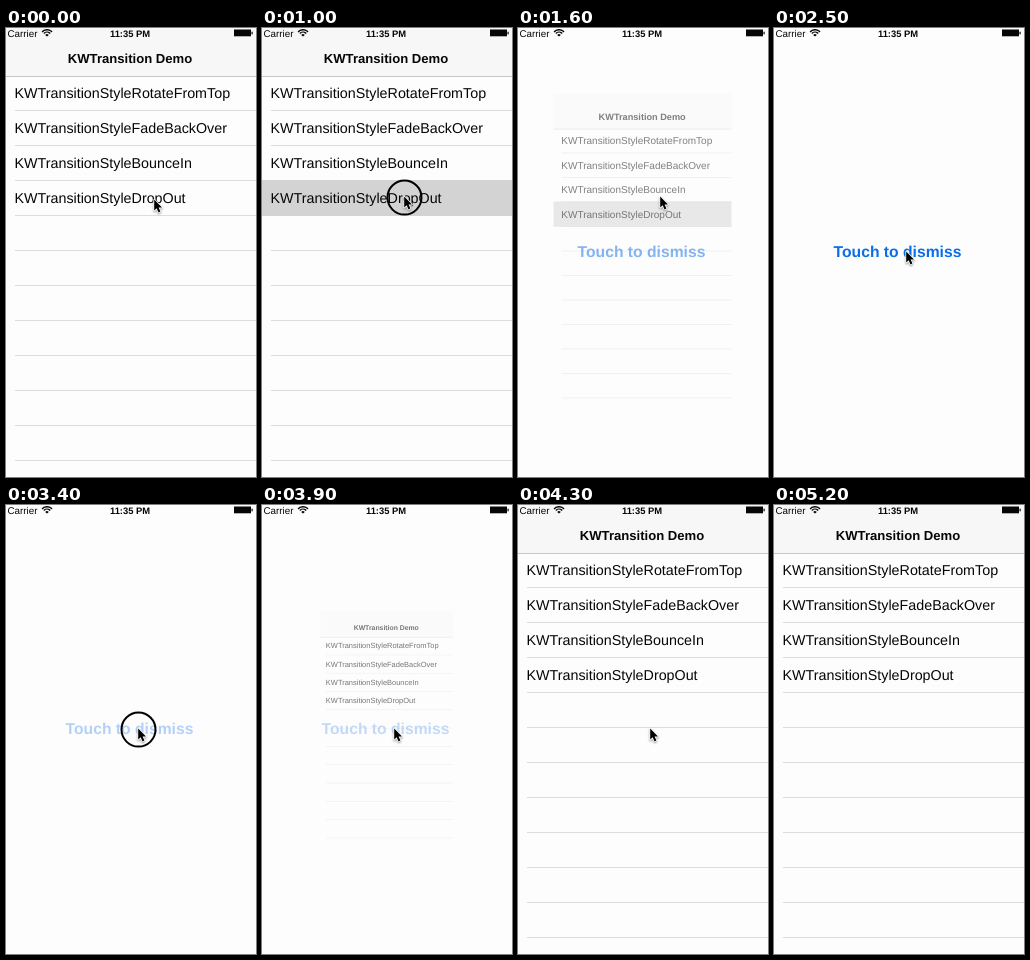
Write an HTML page with a canvas that moves like this. It is 250x449 px and loops after 5.7 s.

```html
<!DOCTYPE html>
<html lang="en">
<head>
<meta charset="utf-8">
<title>Transition demo</title>
<style>
  html, body { margin: 0; width: 100%; height: 100%; overflow: hidden; background: #fdfdfd; }
  canvas { display: block; width: 250px; height: 449px; }
</style>
</head>
<body>
<canvas id="stage" width="250" height="449"></canvas>
<script>
const ctx = document.getElementById('stage').getContext('2d');
const W = 250, H = 449, LOOP = 5700, STEP = 100;
const PAPER = '#fdfdfd', INK = '#060606', BLUE = '#0a6dea';
const FONT = '"Liberation Sans", Arial, sans-serif';
const STYLES = ['RotateFromTop', 'FadeBackOver', 'BounceIn', 'DropOut'];
const ROW = 35, NAV = 48, BACK_SCALE = 0.4;
// The list screen is slightly larger than the visible stage.
const LEFT = -2.5, TOP = -2.5, LIST_W = 254;

const clamp = x => Math.max(0, Math.min(1, x));
const mix = (a, b, k) => a + (b - a) * k;
const between = (t, a, b) => t >= a && t < b;
const ease = (t, start, length) => {
  const x = clamp((t - start) / length);
  return x < 0.5 ? 2 * x * x : 1 - 2 * (1 - x) * (1 - x);
};

function box(x, y, w, h, color) {
  ctx.fillStyle = color;
  ctx.fillRect(x, y, w, h);
}

function label(str, x, y, size, { bold = false, color = INK, align = 'left' } = {}) {
  ctx.font = `${bold ? 'bold ' : ''}${size}px ${FONT}`;
  ctx.textRendering = 'geometricPrecision';
  ctx.textAlign = align;
  ctx.fillStyle = color;
  ctx.fillText(str, x, y);
}

function drawList(scale, alpha, selected) {
  ctx.save();
  ctx.globalAlpha = alpha;
  ctx.translate(124.5 * (1 - scale), 223.8 * (1 - scale));
  ctx.scale(scale, scale);
  box(LEFT, TOP, LIST_W, NAV - TOP, '#f7f7f7');
  box(LEFT, NAV, LIST_W, 1, '#c8c8c8');
  label('KWTransition Demo', 124, 35, 13.1, { bold: true, align: 'center' });
  for (let y = NAV + 34; y < H; y += ROW) box(9, y, LEFT + LIST_W - 9, 1, '#dcdcde');
  if (selected) box(LEFT, 152, LIST_W, 36, '#d3d3d3');
  STYLES.forEach((name, i) => label('KWTransitionStyle' + name, 8.5, 70 + i * ROW, 14.3));
  ctx.restore();
}

function drawButton(alpha) {
  ctx.globalAlpha = alpha;
  label('Touch to dismiss', 123.5, 229, 15.7, { bold: true, color: BLUE, align: 'center' });
  ctx.globalAlpha = 1;
}

function drawStatus() {
  label('Carrier', 1.5, 8.6, 9.8);
  label('11:35 PM', 124, 8.8, 9.4, { bold: true, align: 'center' });
  ctx.strokeStyle = ctx.fillStyle = INK;
  ctx.lineWidth = 1.4;
  for (const r of [4.2, 6.6]) {
    ctx.beginPath();
    ctx.arc(41, 8.3, r, -Math.PI * 0.77, -Math.PI * 0.23);
    ctx.stroke();
  }
  ctx.beginPath();
  ctx.moveTo(41, 8.6);
  ctx.arc(41, 8.6, 2.4, -Math.PI * 0.77, -Math.PI * 0.23);
  ctx.fill();
  box(228, 1.5, 17, 6.8, INK);
  box(245.5, 3.7, 1.2, 2.6, INK);
}

function drawCursor(x, y) {
  const arrow = new Path2D('M0 0V11L2.5 8.7L4.3 12.8L6.2 12L4.4 8H7.8Z');
  ctx.save();
  ctx.translate(x, y);
  ctx.lineJoin = 'round';
  ctx.lineWidth = 1.6;
  ctx.strokeStyle = '#fff';
  ctx.shadowColor = 'rgba(0, 0, 0, 0.4)';
  ctx.shadowBlur = 2;
  ctx.shadowOffsetY = 1;
  ctx.stroke(arrow);
  ctx.shadowColor = 'transparent';
  ctx.fillStyle = '#000';
  ctx.fill(arrow);
  ctx.restore();
}

function drawPress(x, y) {
  ctx.beginPath();
  ctx.arc(x + 0.3, y + 1, 17, 0, Math.PI * 2);
  ctx.lineWidth = 2;
  ctx.strokeStyle = '#000';
  ctx.stroke();
}

// Pointer legs: start time, duration, destination.
const LEGS = [[0, 500, 142.2, 168.6], [2000, 500, 132.2, 223.6], [4300, 400, 141, 160]];

function pointerAt(t) {
  let x = 148.2, y = 171.6;
  for (const [start, length, toX, toY] of LEGS) {
    const k = ease(t, start, length);
    x = mix(x, toX, k);
    y = mix(y, toY, k);
  }
  return [x, y];
}

function draw(t) {
  box(0, 0, W, H, PAPER);
  if (t < 1900) {
    const k = ease(t, 1350, 500);
    drawList(mix(1, BACK_SCALE, k), 1 - k, t >= 1000);
    drawButton(k);
  } else if (t < 3800) {
    drawButton(t < 3400 ? 1 : 0.3);
  } else {
    const k = ease(t, 3740, 500);
    drawList(mix(BACK_SCALE, 1, k), mix(0.42, 1, k), false);
    drawButton(0.3 * (1 - k));
  }
  drawStatus();

  const pointer = pointerAt(t);
  if (between(t, 800, 1100) || between(t, 3400, 3800)) drawPress(...pointer);
  if (t < 5100) drawCursor(...pointer);
}

const began = performance.now();
function tick() {
  const t = (performance.now() - began) % LOOP;
  draw(Math.floor(t / STEP) * STEP);
  requestAnimationFrame(tick);
}
tick();
</script>
</body>
</html>
```
